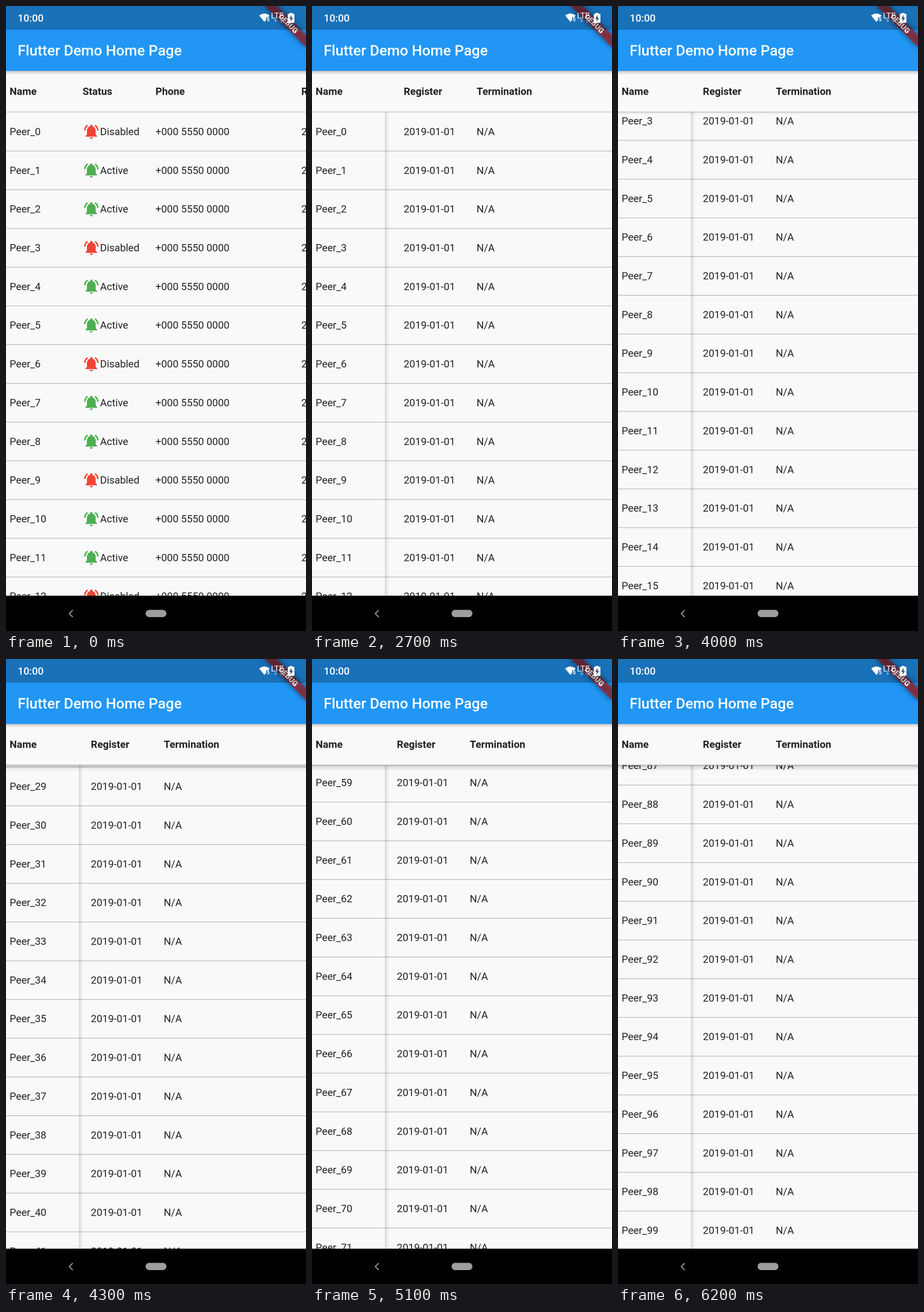
An HTML page with a canvas that plays this animation: 519 px wide and 1079 px high, repeating every 6300 ms.

```html
<!DOCTYPE html>
<html lang="en">
<head>
<meta charset="utf-8">
<title>Scrolling table</title>
<style>
  html, body { margin: 0; width: 100%; height: 100%; overflow: hidden; background: #000; }
  canvas { display: block; width: 519px; height: 1079px; }
</style>
</head>
<body>
<canvas id="stage"></canvas>
<script>
const W = 519, H = 1079, LOOP = 6300, STEP = 100;
// Supersampling lets text sit between whole pixels
const SCALE = 2;
const canvas = document.getElementById('stage');
canvas.width = W * SCALE;
canvas.height = H * SCALE;
const ctx = canvas.getContext('2d');
ctx.scale(SCALE, SCALE);

const DP = 1.2615;
const BAR_TOP = 41, HEAD_TOP = 112, BODY_TOP = 183, BODY_END = 1018;
const ROW = 66.86, ROWS = 100, COL = 100 * DP, PAD = 5 * DP;
const BASELINE = 39.9, HEAD_BASELINE = 153.7;
const MAX_X = 364.1, MAX_Y = 5849.5;
const PAPER = '#faf9fa', INK = '#212121', LINE = '#b0b0b1';
const FONT = 'Roboto, sans-serif';
const CELL = `400 ${14 * DP}px ${FONT}`, HEAD = `700 ${14 * DP}px ${FONT}`;
const COLUMNS = [['Status', 1], ['Phone', 2], ['Register', 4], ['Termination', 5]];

const BELL = new Path2D('M7.58 4.08L6.15 2.65C3.75 4.48 2.17 7.3 2.03 10.5h2c.15-2.65 1.51-4.97 3.55-6.42z' +
  'm12.39 6.42h2c-.15-3.2-1.73-6.02-4.12-7.85l-1.42 1.43c2.02 1.45 3.39 3.77 3.54 6.42z' +
  'M18 11c0-3.07-1.64-5.64-4.5-6.32V4c0-.83-.67-1.5-1.5-1.5s-1.5.67-1.5 1.5v.68C7.63 5.36 6 7.92 6 11v5l-2 2v1h16v-1l-2-2v-5z' +
  'm-6 11c.14 0 .27-.01.4-.04.65-.14 1.18-.58 1.44-1.18.1-.24.15-.5.15-.78h-4c.01 1.1.9 2 2.01 2z');

// Decelerating travel of a fling, p from 0 to 1
function fling(p) {
  p = Math.min(1, Math.max(0, p));
  return 1.2 * p ** 3 - 3.27 * p ** 2 + 3.065 * p;
}

function scrollX(t) {
  return t < 2300 ? 0 : Math.min(MAX_X, 122.5 + 243 * fling((t - 2300) / 600));
}

function scrollY(t) {
  if (t < 4000) return 0;
  const first = 218.9 + 4025.4 * fling((Math.min(t, 5300) - 4000) / 1795);
  return Math.min(MAX_Y, first + 2600 * fling((t - 5300) / 1500));
}

function rect(x, y, w, h, color) {
  ctx.fillStyle = color;
  ctx.fillRect(x, y, w, h);
}

function text(str, x, y, font, color = INK) {
  ctx.font = font;
  ctx.fillStyle = color;
  ctx.fillText(str, x, y);
}

function polygon(points, color) {
  ctx.fillStyle = color;
  ctx.beginPath();
  points.forEach(([x, y]) => ctx.lineTo(x, y));
  ctx.fill();
}

function pill(x, y, w, h, r, color) {
  ctx.fillStyle = color;
  ctx.beginPath();
  ctx.roundRect(x, y, w, h, r);
  ctx.fill();
}

function clipped(x, y, w, h, draw) {
  ctx.save();
  ctx.beginPath();
  ctx.rect(x, y, w, h);
  ctx.clip();
  draw();
  ctx.restore();
}

function shadow(x, y, w, h, vertical, alpha) {
  const g = vertical ? ctx.createLinearGradient(0, y, 0, y + h) : ctx.createLinearGradient(x, 0, x + w, 0);
  g.addColorStop(0, `rgba(0,0,0,${alpha})`);
  g.addColorStop(0.4, `rgba(0,0,0,${alpha * 0.4})`);
  g.addColorStop(1, 'rgba(0,0,0,0)');
  rect(x, y, w, h, g);
}

const elevation = offset => Math.min(5, offset / DP / 100);

function statusCell(i, x, y) {
  const off = i % 3 === 0;
  ctx.save();
  ctx.translate(x, y + 18.7);
  ctx.scale(DP, DP);
  ctx.fillStyle = off ? '#f44336' : '#4caf50';
  ctx.fill(BELL);
  ctx.restore();
  text(off ? 'Disabled' : 'Active', x + 24 * DP, y + BASELINE, CELL);
}

function drawTable(sx, sy) {
  rect(0, HEAD_TOP, W, BODY_END - HEAD_TOP, PAPER);
  const colX = n => n * COL + PAD - sx;
  const first = Math.floor(sy / ROW);
  const last = Math.min(ROWS - 1, first + 13);
  const eachRow = draw => {
    for (let i = first; i <= last; i++) draw(i, BODY_TOP + i * ROW - sy);
  };

  clipped(COL, HEAD_TOP, W - COL, BODY_TOP - HEAD_TOP, () =>
    COLUMNS.forEach(([label, n]) => text(label, colX(n), HEAD_BASELINE, HEAD)));
  text('Name', PAD, HEAD_BASELINE, HEAD);

  clipped(0, BODY_TOP, W, BODY_END - BODY_TOP, () => {
    clipped(COL, BODY_TOP, W - COL, BODY_END - BODY_TOP, () => eachRow((i, y) => {
      statusCell(i, colX(1), y);
      text('+000 5550 0000', colX(2), y + BASELINE, CELL);
      text('2019-01-01', colX(4), y + BASELINE, CELL);
      text('N/A', colX(5), y + BASELINE, CELL);
    }));
    eachRow((i, y) => {
      text('Peer_' + i, PAD, y + BASELINE, CELL);
      rect(0, y + ROW, W, 1, LINE);
    });
    const ex = elevation(sx), ey = elevation(sy);
    if (ex) shadow(COL, BODY_TOP, 2 + 2 * ex, BODY_END - BODY_TOP, false, Math.min(0.16, ex * 0.055));
    if (ey) shadow(0, BODY_TOP, W, 2 + 1.6 * ey, true, Math.min(0.24, ey * 0.07));
  });
  rect(0, BODY_TOP - 0.5, W, 1, LINE);
}

function drawBanner() {
  ctx.save();
  ctx.translate(W, 0);
  ctx.rotate(Math.PI / 4);
  ctx.shadowColor = 'rgba(0,0,0,0.8)';
  ctx.shadowBlur = 8 * DP * SCALE;
  rect(-40 * DP, 28 * DP, 80 * DP, 12 * DP, 'rgba(183,28,28,0.63)');
  ctx.shadowColor = 'transparent';
  ctx.textAlign = 'center';
  text('DEBUG', 0, 34 * DP + 4.6, `900 ${10.2 * DP}px ${FONT}`, '#fff');
  ctx.restore();
}

function drawStatusIcons() {
  text('10:00', 20.2, 27, `500 ${14 * DP}px ${FONT}`, '#fff');

  ctx.fillStyle = '#fff';
  ctx.beginPath();
  ctx.moveTo(447, 27.5);
  ctx.lineTo(438, 16.5);
  ctx.quadraticCurveTo(447, 9.5, 456, 16.5);
  ctx.lineTo(453.5, 19.5);
  ctx.lineTo(450, 19.5);
  ctx.lineTo(450, 24);
  ctx.fill();
  text('5', 451, 26.5, `700 9px ${FONT}`, '#fff');

  const dim = 'rgba(255,255,255,0.35)';
  rect(465.5, 21, 2, 4, dim);
  polygon([[463, 24.5], [470, 24.5], [466.5, 28.5]], dim);
  rect(475.5, 25, 2, 4, dim);
  polygon([[473, 25.5], [480, 25.5], [476.5, 21.5]], dim);
  text('LTE', 458.5, 21.7, `400 14px ${FONT}`, '#fff');

  rect(490.5, 12, 5, 2, '#fff');
  pill(487.5, 13.5, 11.5, 15.5, 1.5, '#fff');
  polygon([[494, 15.5], [490, 22], [492.5, 22], [492.5, 27], [496.5, 20.5], [494, 20.5]], '#2d4f7c');
}

function drawAppBar() {
  shadow(0, HEAD_TOP, W, 7, true, 0.25);
  rect(0, 0, W, HEAD_TOP, '#2196f5');
  text('Flutter Demo Home Page', 16 * DP, 85.4, `500 ${20 * DP}px ${FONT}`, '#fff');
  clipped(0, 0, W, HEAD_TOP, drawBanner);
  rect(0, 0, W, BAR_TOP, 'rgba(0,0,0,0.25)');
  drawStatusIcons();
}

function drawNavBar() {
  rect(0, BODY_END, W, H - BODY_END, '#000');
  ctx.strokeStyle = '#9c9c9c';
  ctx.lineWidth = 1.8;
  ctx.beginPath();
  ctx.moveTo(115.5, 1043);
  ctx.lineTo(109.5, 1049);
  ctx.lineTo(115.5, 1055);
  ctx.stroke();
  pill(241.5, 1042.5, 36, 12.5, 6.2, '#9e9e9e');
}

function draw(t) {
  drawTable(scrollX(t), scrollY(t));
  drawAppBar();
  drawNavBar();
}

let start;
function tick(now) {
  start ??= now;
  const t = (now - start) % LOOP;
  draw(Math.floor(t / STEP) * STEP);
  requestAnimationFrame(tick);
}
draw(0);
requestAnimationFrame(tick);
</script>
</body>
</html>
```
